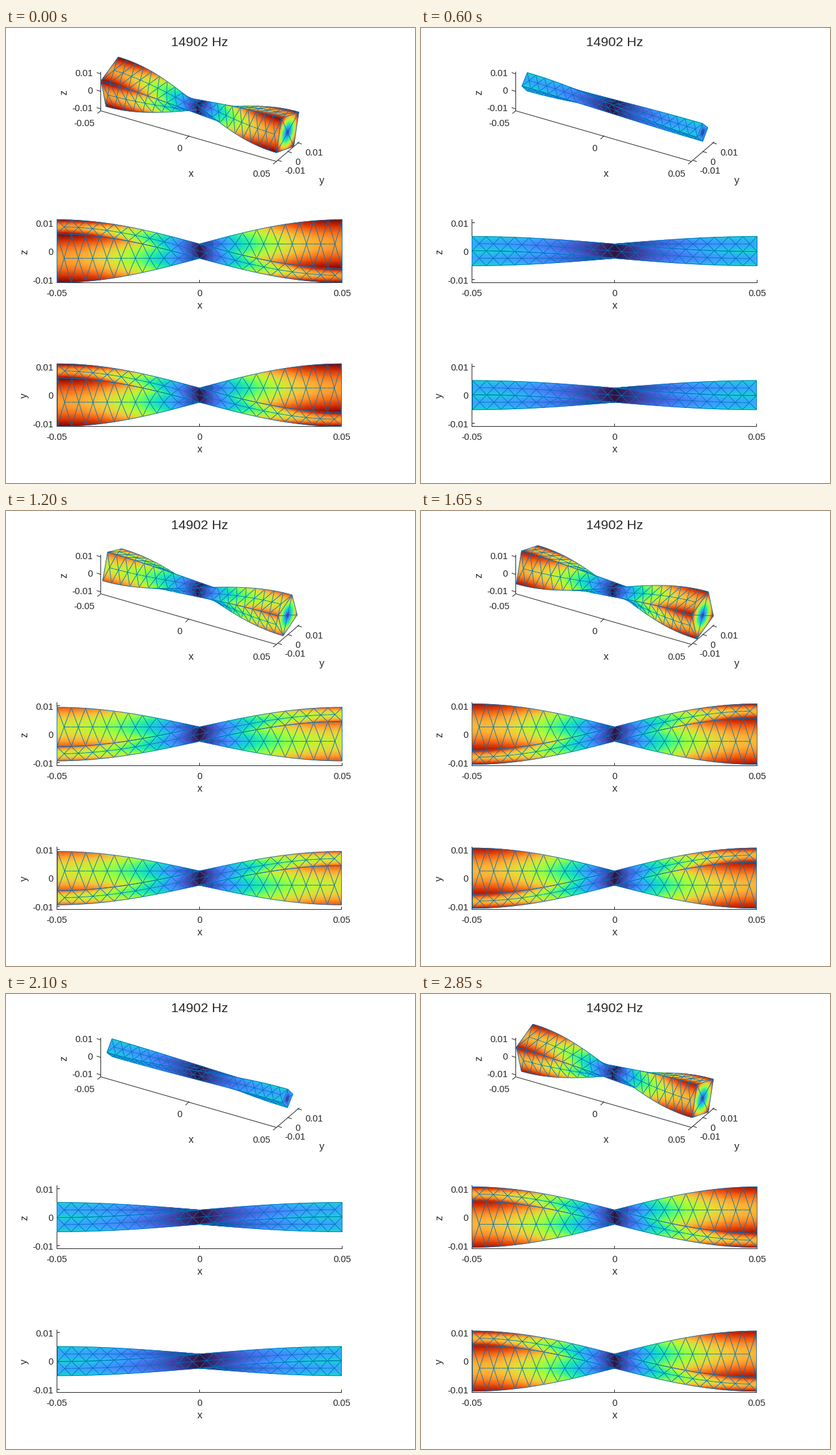
Recreate the animation shown at these times as a matplotlib script. Size 654 px wide and 728 px high, loop 3000 ms.

```python
import numpy as np
import matplotlib.pyplot as plt
from matplotlib.animation import FuncAnimation
from matplotlib.collections import LineCollection, TriMesh
from matplotlib.tri import Triangulation

W, H = 654, 728
FRAMES, INTERVAL = 20, 150
PT = 0.72                       # points per pixel at 100 dpi
INK = "#262626"
EDGE = "#0072bd"

# Lengths are in units of 0.01 m
HALF_LEN, HALF_SIDE = 5.0, 0.25
TWIST = 3.412
LIMIT = HALF_SIDE * (1 + TWIST)
CELLS = 20
CELL = 2 * HALF_LEN / CELLS

plt.rcParams["font.family"] = "Liberation Sans"
fig = plt.figure(figsize=(W / 100, H / 100), dpi=100, facecolor="white")
ax = fig.add_axes([0, 0, 1, 1])
ax.set_xlim(0, W)
ax.set_ylim(H, 0)
ax.axis("off")


class View:
    def __init__(self, origin, matrix):
        self.origin = np.array(origin)
        self.matrix = np.array(matrix)

    def __call__(self, points):
        return self.origin + np.asarray(points) @ self.matrix.T


def oblique(origin, scale, az, el):
    ca, sa, ce, se = np.cos(az), np.sin(az), np.cos(el), np.sin(el)
    return View(origin, [[scale * ca, scale * sa, 0],
                         [scale * sa * se, -scale * ca * se, -scale * ce]])


iso = oblique((310, 126.5), 32.4, np.pi / 6, np.pi / 6)
front = View((309.5, 357.0), [[45.6, 0, 0], [0, 0, -45.6]])
top = View((309.4, 587.4), [[45.42, 0, 0], [0, -45.42, 0]])


# ---- beam geometry ----

def deform(x, y, z, amp):
    """Twisted points and their displacement relative to the largest one."""
    k = TWIST * amp * np.sin(np.pi * x / (2 * HALF_LEN))
    points = np.stack([x + 0 * y, y - k * z, z + k * y], axis=-1)
    size = np.abs(k) * np.hypot(y, z) / (TWIST * HALF_SIDE * np.sqrt(2))
    return points, size


def side(face, x, v, amp):
    """Point on one of the four long faces, v in -1..1 across it."""
    y, z = HALF_SIDE + 0 * v, HALF_SIDE * v
    for _ in range(face):
        y, z = -z, y
    return deform(x, y, z, amp)


def cross(a, b):
    return a[..., 0] * b[..., 1] - a[..., 1] * b[..., 0]


def cell_edges(i):
    """Mesh edges of one cell as (x, v) pairs: a centre node joined to its corners."""
    a = -HALF_LEN + i * CELL
    b, c = a + CELL, a + CELL / 2
    first, last = i == 0, i == CELLS - 1
    edges = [((x, v), (c, 0)) for x in (a, b) for v in (-1, 1)]
    edges += [((a, v), (b, v)) for v in (-1, 1)]
    edges.append(((c if first else a, 0), (c if last else b, 0)))
    if first:
        edges.append(((a, -1), (a, 1)))
    if last:
        edges.append(((b, -1), (b, 1)))
    return np.array(edges, dtype=float)


def grid_triangles(nx, nv):
    n = np.arange(nx * nv).reshape(nx, nv)
    a, b = n[:-1, :-1].ravel(), n[1:, :-1].ravel()
    c, d = n[1:, 1:].ravel(), n[:-1, 1:].ravel()
    return np.concatenate([np.stack([a, b, c], 1), np.stack([a, c, d], 1)])


NX, NV = 3, 9
CELL_TRIS = grid_triangles(NX, NV)
END_TRIS = grid_triangles(13, 13)

artists = []


def paint(points, values, tris, lines):
    if len(tris):
        mesh = TriMesh(Triangulation(points[:, 0], points[:, 1], tris), cmap="turbo")
        mesh.set_array(values)
        mesh.set_clim(0, 1)
        mesh.set_zorder(3)
        artists.append(ax.add_collection(mesh, autolim=False))
    edges = LineCollection(lines, colors=EDGE, linewidths=0.9 * PT, zorder=3)
    edges.set_snap(False)
    artists.append(ax.add_collection(edges, autolim=False))


def paint_cell(view, i, amp):
    xs = -HALF_LEN + CELL * (i + np.linspace(0, 1, NX))
    x, v = np.meshgrid(xs, np.linspace(-1, 1, NV), indexing="ij")
    edges = cell_edges(i)
    mid = edges.mean(axis=1)
    steps = np.array([0, 0.5, 1])[:, None, None]
    path = edges[:, 0] + steps * (edges[:, 1] - edges[:, 0])
    points, values, tris, lines = [], [], [], []
    for face in range(4):
        xyz, size = side(face, x.ravel(), v.ravel(), amp)
        p = view(xyz)
        t = p[CELL_TRIS]
        seen = cross(t[:, 1] - t[:, 0], t[:, 2] - t[:, 0]) > 0
        tris.append(CELL_TRIS[seen] + face * NX * NV)
        points.append(p)
        values.append(size)

        def at(dx, dv):
            return view(side(face, mid[:, 0] + dx, mid[:, 1] + dv, amp)[0])

        facing = cross(at(0.01, 0) - at(-0.01, 0), at(0, 0.01) - at(0, -0.01)) > 0
        route = view(side(face, path[..., 0], path[..., 1], amp)[0])
        lines += list(route.transpose(1, 0, 2)[facing])
    paint(np.concatenate(points), np.concatenate(values), np.concatenate(tris), lines)


def paint_end(view, amp):
    s = np.linspace(-HALF_SIDE, HALF_SIDE, 13)
    y, z = (g.ravel() for g in np.meshgrid(s, s, indexing="ij"))
    xyz, size = deform(np.full(y.shape, HALF_LEN), y, z, amp)
    cy = HALF_SIDE * np.array([1, -1, -1, 1, 0])
    cz = HALF_SIDE * np.array([1, 1, -1, -1, 0])
    q = view(deform(np.full(5, HALF_LEN), cy, cz, amp)[0])
    lines = [q[[0, 1, 2, 3, 0]]] + [q[[j, 4]] for j in range(4)]
    paint(view(xyz), size, END_TRIS, lines)


# ---- axes and labels ----

def line(*points):
    """Axis line whose corners sit on pixel centres."""
    x, y = np.floor(np.array(points)).T + 0.5
    ax.plot(x, y, color=INK, lw=PT, zorder=1, snap=False, solid_capstyle="projecting")


def label(x, base, s, size=14.67, ha="center", rot=0):
    ax.text(x, base, s, fontsize=size * PT, color=INK, ha=ha, va="baseline",
            rotation=rot, rotation_mode="anchor")


def number(x, mid, s, ha):
    label(x, mid + 5.3, s, ha=ha)


def flat_axes(view, name, name_y):
    (cx, cy), s = view.origin, view.matrix[0, 0]
    left, right = 81.5, cx + HALF_LEN * s
    bottom = cy + LIMIT * s
    line((left, cy - LIMIT * s), (left, bottom), (right, bottom))
    for x, text in ((left, "-0.05"), (cx, "0"), (right, "0.05")):
        line((x, bottom), (x, bottom - 4))
        number(x, bottom + 16.2, text, "center")
    for v, text in ((1, "0.01"), (0, "0"), (-1, "-0.01")):
        line((left, cy - v * s), (left + 4, cy - v * s))
        number(76, cy - v * s + 0.8, text, "right")
    label(310, bottom + 42, "x", 16.1)
    label(34.3, name_y, name, 16.1, rot=90)


def tick(view, point, axis, sign):
    """Outward tick along the screen direction of a data axis."""
    d = view.matrix[:, axis]
    p = view(point)
    line(p, p + sign * 6.4 * d / np.hypot(*d))


def iso_axes():
    lo = -LIMIT
    line(*(iso(p) for p in ((-5, lo, LIMIT), (-5, lo, lo), (5, lo, lo), (5, LIMIT, lo))))
    for x, place, text in ((-5, (142, 152), "-0.05"), (0, (281.5, 191.5), "0"),
                           (5, (423, 233), "0.05")):
        tick(iso, (x, lo, lo), 1, -1)
        number(*place, text, "right")
    for v, text, zy, y_place in ((1, "0.01", 71.5, (478, 199)), (0, "0", 99.5, (462, 213.5)),
                                 (-1, "-0.01", 127.5, (445.5, 227.5))):
        tick(iso, (-5, lo, v), 0, -1)
        number(139, zy, text, "right")
        tick(iso, (5, v, lo), 0, 1)
        number(*y_place, text, "left")
    label(296, 238, "x", 16.1)
    label(505, 249, "y", 16.1)
    label(97.3, 103, "z", 16.1, rot=90)


label(309.5, 29, "14902 Hz", 21.33)
iso_axes()
flat_axes(front, "z", 357.5)
flat_axes(top, "y", 588)


def update(n):
    while artists:
        artists.pop().remove()
    amp = np.cos(2 * np.pi * n / FRAMES)
    for view in (iso, front, top):
        for i in range(CELLS):      # far to near along the beam
            paint_cell(view, i, amp)
    paint_end(iso, amp)
    return artists


anim = FuncAnimation(fig, update, frames=FRAMES, interval=INTERVAL,
                     repeat=True, repeat_delay=0, blit=False)
plt.show()
```
